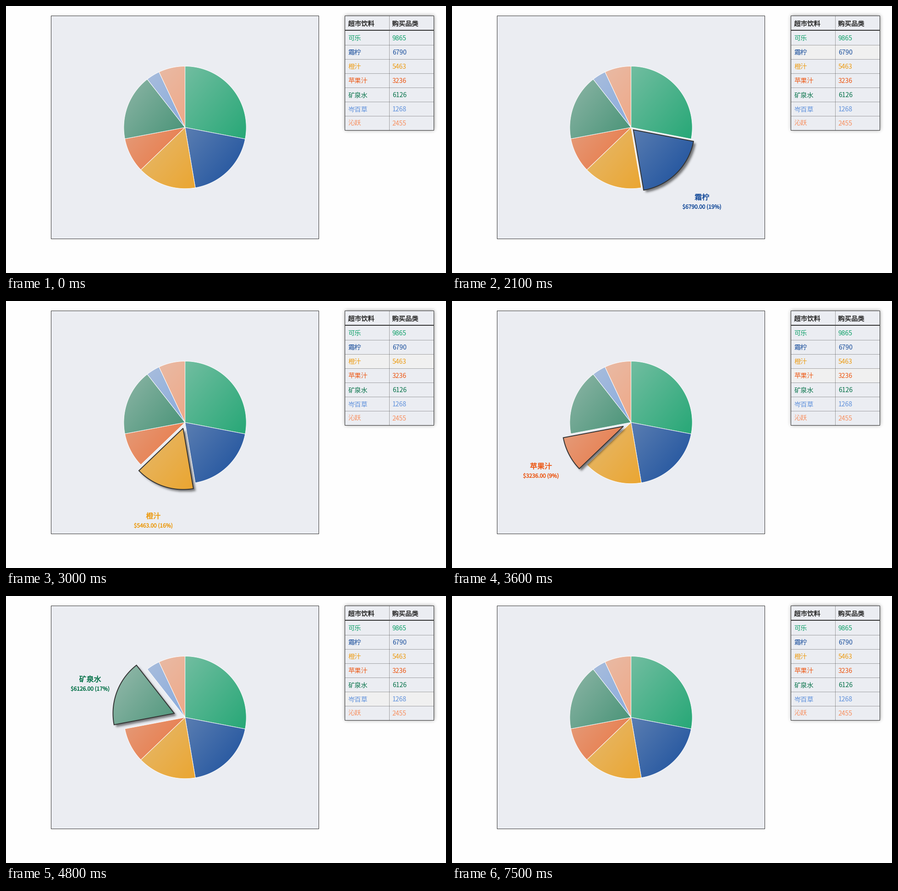
Animation, 960 px wide and 583 px high, one loop 8 s. Source, as a matplotlib script:

```python
import numpy as np
import matplotlib.pyplot as plt
from matplotlib.animation import FuncAnimation
from matplotlib.patches import PathPatch, Rectangle
from matplotlib.patheffects import withStroke
from matplotlib.path import Path

W, H, DPI = 960, 583, 100
PT = 72 / DPI            # points per pixel
SCALE = 0.972            # page zoom
CX, CY, RADIUS = 390.6, 265.1, 137.5 * SCALE
MAX_PULL = 25
LABEL_DIST = (137.5 + MAX_PULL + 65) * SCALE
FONT = "Noto Sans CJK JP"
INK, PANEL = "#333333", "#ebedf2"
HOVER, PICKED = "#f0f0f0", "#e8e8e8"

DRINKS = [
    ("可乐", 9865, "#0da068"),
    ("霜柠", 6790, "#194e9c"),
    ("橙汁", 5463, "#ed9c13"),
    ("苹果汁", 3236, "#ed5713"),
    ("矿泉水", 6126, "#057249"),
    ("岑百草", 1268, "#5f91dc"),
    ("沁跃", 2455, "#f88e5d"),
]
VALUES = np.array([d[1] for d in DRINKS])
EDGES = np.concatenate([[0], np.cumsum(VALUES)]) / VALUES.sum() * 2 * np.pi

# click tick, first moving tick, slice, pull distance per tick
PULLS = [
    (11, 11, 0, (12, 24)),
    (21, 21, 1, (4, 16, 24)),
    (30, 30, 2, (8, 16, 24)),
    (36, 36, 3, (12, 24)),
    (45, 45, 4, (12, 24)),
    (48, 49, 5, (12, 24)),
    (53, 54, 6, (12, 24)),
    (75, 75, None, (0,)),
]
# tick, row under the pointer
HOVERS = [(1, 0), (16, 1), (25, 2), (32, 3), (42, 4), (48, 5), (53, 6), (55, None)]

fig = plt.figure(figsize=(W / DPI, H / DPI), dpi=DPI, facecolor="#fefefe")
ax = fig.add_axes([0, 0, 1, 1])
ax.axis("off")


def blur(mask, sigma):
    reach = int(np.ceil(sigma * 3))
    kernel = np.exp(-0.5 * (np.arange(-reach, reach + 1) / sigma) ** 2)
    kernel /= kernel.sum()
    for axis in (0, 1):
        mask = np.apply_along_axis(np.convolve, axis, mask, kernel, "same")
    return mask


def shade(alpha):
    return np.dstack([np.zeros(alpha.shape + (3,)), alpha])


def picture(data, x, y, zorder):
    h, w = data.shape[:2]
    return ax.imshow(data, extent=(x, x + w, y + h, y), aspect="auto",
                     interpolation="nearest", zorder=zorder)


def box(x0, y0, x1, y1, face, edge="none", zorder=1.0):
    return ax.add_patch(Rectangle((x0, y0), x1 - x0, y1 - y0, facecolor=face,
                                  edgecolor=edge, linewidth=PT, zorder=zorder,
                                  snap=False))


def rule(xs, ys, width=1, dotted=False):
    ax.plot(xs, ys, color="#555555" if dotted else INK, linewidth=width * PT,
            linestyle=(0, (1, 1)) if dotted else "-", zorder=4, snap=False,
            dash_capstyle="butt", solid_capstyle="butt")


def write(x, y, text, size, color, heavy=0, **kw):
    t = ax.text(x, y, text, fontsize=size * PT, color=color, family=FONT,
                va="baseline", zorder=30, **kw)
    if heavy:
        t.set_path_effects([withStroke(linewidth=heavy * PT, foreground=color)])
    return t


def direction(i):
    mid = (EDGES[i] + EDGES[i + 1]) / 2
    return np.sin(mid), -np.cos(mid)


def apex(i, pull):
    dist = pull * ((1 - pull / MAX_PULL) ** 0.8 + 1) * SCALE
    dx, dy = direction(i)
    return CX + dx * dist, CY + dy * dist


def wedge(i, pull=0):
    x, y = apex(i, pull)
    a = np.linspace(EDGES[i], EDGES[i + 1], 80)
    arc = np.column_stack([x + RADIUS * np.sin(a), y - RADIUS * np.cos(a)])
    return Path(np.vstack([[x, y], arc, [x, y]]), closed=True)


# Pixel grid that holds the pie and every pulled slice
GX, GY, SIDE = 220, 95, 340
px, py = np.meshgrid(GX + 0.5 + np.arange(SIDE), GY + 0.5 + np.arange(SIDE))


def slice_shadow(i, pull):
    x, y = apex(i, pull)
    dx, dy = px - x - 5 * SCALE, py - y - 5 * SCALE
    angle = np.arctan2(dx, -dy) % (2 * np.pi)
    inside = (angle >= EDGES[i]) & (angle < EDGES[i + 1]) & (np.hypot(dx, dy) < RADIUS)
    return shade(0.5 * blur(inside.astype(float), 2.4))


def gradient(color):
    vx, vy = 450 * SCALE, 375 * SCALE
    t = ((px - 99) * vx + (py - 22) * vy) / (vx * vx + vy * vy)
    t = np.clip(t, 0, 1)[..., None]
    end = np.array([int(color[k:k + 2], 16) for k in (1, 3, 5)]) / 255
    return (1 - t) * (221 / 255) + t * end


# Chart panel
box(98.5, 21.5, 682.5, 508.5, PANEL, INK)

# Table
LEFT, MID, RIGHT, TOP, BOTTOM = 739.5, 836.5, 933.5, 21.5, 271.5
glow = np.zeros((290, 234))
glow[20:270, 20:214] = 1
picture(shade(0.45 * blur(glow, 4)), LEFT - 20, TOP - 20, 0.5)
box(LEFT, TOP, RIGHT, BOTTOM, PANEL)
box(LEFT, TOP, RIGHT, BOTTOM, "none", INK, 5)
rule([LEFT, RIGHT], [53, 53], 2)
rule([MID, MID], [TOP, BOTTOM], dotted=True)
write(746.5, 43.5, "超市饮料", 14.3, INK, heavy=0.5)
write(842.5, 43.5, "购买品类", 14.3, INK, heavy=0.5)

rows, slices, fills, titles, amounts = [], [], [], [], []
for i, (name, value, color) in enumerate(DRINKS):
    y = 54 + 31 * i
    rows.append(box(LEFT, y, RIGHT, y + 31, PANEL, zorder=2))
    if i < len(DRINKS) - 1:
        rule([LEFT, RIGHT], [y + 31.5] * 2, dotted=True)
    write(746.5, y + 21.3, name, 14.2, color)
    write(842.8, y + 21, str(value), 14, color)

    fills.append(picture(gradient(color), GX, GY, 10))
    slices.append(ax.add_patch(PathPatch(wedge(i), facecolor="none", joinstyle="miter")))

    dx, dy = direction(i)
    x, y = CX + dx * LABEL_DIST, CY + dy * LABEL_DIST
    share = int(value / VALUES.sum() * 100 + 0.5)
    titles.append(write(x, y, name, 16, color, heavy=0.4, ha="center"))
    amounts.append(write(x, y + 20 * SCALE, f"${value}.00 ({share}%)", 12, color,
                         heavy=0.4, ha="center", parse_math=False))

shadow = picture(shade(np.zeros((SIDE, SIDE))), GX, GY, 20)
ax.set_xlim(0, W)
ax.set_ylim(H, 0)


def draw(tick):
    out = pull = picked = hover = None
    for click, start, i, steps in PULLS:
        if tick >= click:
            picked = i
        if tick >= start:
            out, pull = i, steps[min(tick - start, len(steps) - 1)]
    for start, row in HOVERS:
        if tick >= start:
            hover = row

    for i in range(len(DRINKS)):
        is_out = i == out
        rows[i].set_facecolor(HOVER if i == hover else PICKED if i == picked else PANEL)
        slices[i].set_path(wedge(i, pull if is_out else 0))
        slices[i].set_edgecolor(INK if is_out else "white")
        slices[i].set_linewidth((2 if is_out else 1) * SCALE * PT)
        z = 21 if is_out else 10 + i
        fills[i].set_zorder(z)
        slices[i].set_zorder(z + 0.5)
        fills[i].set_clip_path(slices[i])
        titles[i].set_visible(is_out)
        amounts[i].set_visible(is_out)

    shadow.set_visible(out is not None)
    if out is not None:
        shadow.set_data(slice_shadow(out, pull))
    return []


anim = FuncAnimation(fig, draw, frames=80, interval=100, init_func=lambda: draw(0),
                     repeat=True, repeat_delay=0, blit=False)
plt.show()
```
